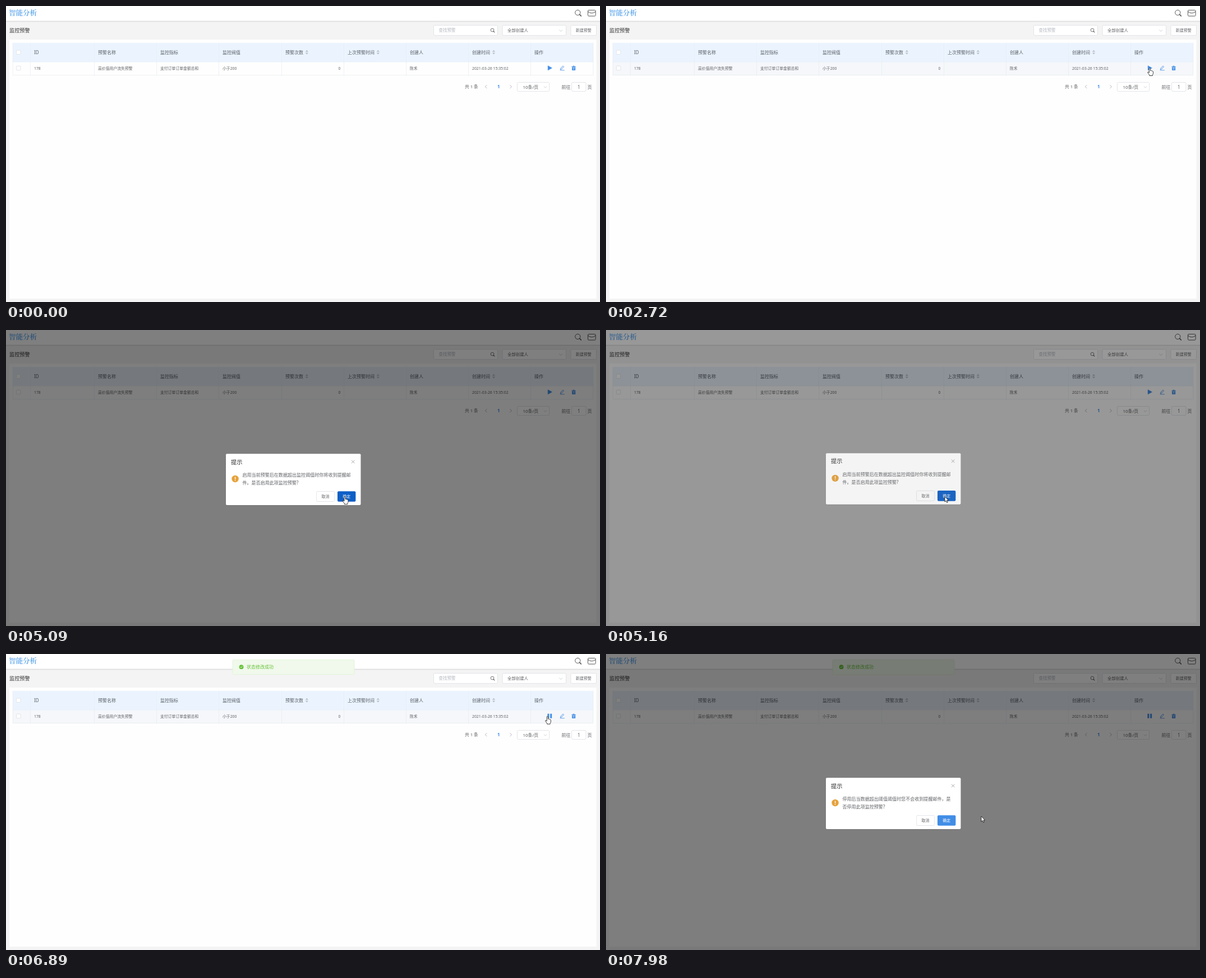
Animation, 1059 px wide and 529 px high, one loop 8 s. Source, as an HTML page:

```html
<!DOCTYPE html>
<html lang="zh-CN">
<head>
<meta charset="utf-8">
<style>
html, body { margin: 0; width: 100%; height: 100%; overflow: hidden; background: #f4f4f4; }
svg { display: block; width: 100%; height: 100%; font-family: "Noto Sans", "Noto Sans CJK SC", "Noto Sans CJK", sans-serif; }
</style>
</head>
<body>
<svg id="stage" viewBox="0 0 1059 529" xmlns="http://www.w3.org/2000/svg"></svg>
<script>
const LOOP = 8000;
const stage = document.getElementById('stage');

// Markup helpers; text is placed by its vertical middle.
const text = (x, y, size, str, fill = '#606266', extra = '') =>
  `<text x="${x}" y="${y + size * 0.37}" font-size="${size}" fill="${fill}" ${extra}>${str}</text>`;
const rect = (x, y, w, h, fill, extra = '') =>
  `<rect x="${x}" y="${y}" width="${w}" height="${h}" fill="${fill}" ${extra}/>`;
const box = (x, y, w, h, fill = '#fff', line = '#dcdfe6', r = 2) =>
  rect(x, y, w, h, fill, `rx="${r}" stroke="${line}" stroke-width=".8"`);
const line = (d, color, width = 0.8) =>
  `<path d="${d}" fill="none" stroke="${color}" stroke-width="${width}" stroke-linecap="round" stroke-linejoin="round"/>`;
const lens = (x, y, r, color, width) =>
  `<circle cx="${x}" cy="${y}" r="${r}" fill="none" stroke="${color}" stroke-width="${width}"/>` +
  line(`M${x + r * 0.72} ${y + r * 0.72}l${r * 0.6} ${r * 0.6}`, color, width * 1.5);
const middle = 'text-anchor="middle"';
const BLUE = '#418de6';

const columns = [
  [43.5, 'ID', '178'],
  [157.5, '预警名称', '高价值用户流失预警'],
  [268.5, '监控指标', '支付订单订单金额总和'],
  [379.5, '监控阀值', '小于200'],
  [491.5, '预警次数', ''],
  [602.5, '上次预警时间', ''],
  [713.5, '创建人', '陈禾'],
  [824.5, '创建时间', '2021-03-26 15:35:02'],
  [935.5, '操作', '']
];

function topBar() {
  return rect(0, 0, 1059, 29, '#ededed') + rect(0, 0, 1059, 28, '#dedede') + rect(0, 0, 1059, 26.6, '#fff') +
    text(5, 12.5, 12.5, '智能分析', '#6caeee',
      'font-weight="700" style="font-family:\'Noto Serif CJK SC\',\'Noto Sans CJK SC\',\'Noto Sans CJK\',serif"') +
    lens(1019.3, 11.8, 4.6, '#555', 1) +
    `<rect x="1037.5" y="7.4" width="13.6" height="10.6" rx="1.6" fill="none" stroke="#555"/>` +
    line('M1037.8 10.3q6.5 5 13 0', '#555', 1);
}

function filters() {
  return text(6, 43.3, 9.2, '监控预警', '#303133', 'font-weight="500"') +
    box(762.5, 34.5, 114, 18) + text(771.5, 43.7, 7.5, '查找预警', '#b4b8c0') + lens(867, 43, 2.9, '#555', 0.8) +
    box(885, 34.5, 113.5, 18) + text(894, 43.7, 7.4, '全部创建人') + line('M986.5 42.8l2.7 2.7l2.7-2.7', '#c0c4cc') +
    box(1007, 34.5, 45.5, 18) + text(1029.8, 43.7, 7, '新建预警', '#606266', middle);
}

function table() {
  const check = y => box(18.5, y, 7.5, 7.5, '#fff', '#dcdfe6', 1);
  const sort = x => `<path d="M${x - 2.7} 81.7l2.7-3l2.7 3zM${x - 2.7} 83.5l2.7 3l2.7-3z" fill="#b9bec8"/>`;
  let out = rect(12, 66, 1035, 34, '#ebf4fe') + rect(12, 100, 1035, 24, '#f5f7fa', 'id="row"');
  let grid = 'M12.3 66V123.7H1046.8V66M12 100H1047';
  for (const [x, head, cell] of columns) {
    grid += `M${x} 66V124`;
    out += text(x + 6.5, 82.8, 8, head, '#5a5e66', 'font-weight="500"') + text(x + 6.5, 111, 6.85, cell);
  }
  return out + line(grid, '#e6ebf3', 0.7) + check(79) + check(107.3) +
    text(596.5, 111, 6.85, '0', '#606266', 'text-anchor="end"') + sort(536.3) + sort(663.3) + sort(869.5);
}

function actions() {
  return `<path id="play" d="M966.2 106.8L973.4 110.8L966.2 114.8Z" fill="${BLUE}" stroke="${BLUE}" stroke-width=".6" stroke-linejoin="round"/>` +
    `<path id="pause" d="M965.4 106.8h3v8h-3zM970.2 106.8h3v8h-3z" fill="${BLUE}"/>` +
    line('M988.6 113.2l.5-2.1l4-4l1.5 1.5l-4 4z', BLUE, 0.9) + line('M988 114.8h7.4', BLUE, 0.8) +
    `<path d="M1008.4 107.9h7.4v1h-7.4zM1010.6 106.8h3v1h-3zM1009 109.4h6.2v4.8q0 .8-.8.8h-4.6q-.8 0-.8-.8z" fill="${BLUE}"/>` +
    line('M1011.2 110.8v2.6M1013 110.8v2.6', '#fff', 0.6);
}

function pager() {
  return text(818, 144, 7.7, '共 1 条') + line('M857 141.5l-2.6 2.7l2.6 2.7', '#a0a4ac') +
    text(878.3, 144, 8, '1', BLUE, middle + ' font-weight="700"') + line('M898.8 141.5l2.6 2.7l-2.6 2.7', '#a0a4ac') +
    box(911.5, 136.5, 57, 16) + text(921.5, 144.8, 7.9, '10条/页') + line('M959.3 144l2.2 2.2l2.2-2.2', '#c0c4cc') +
    text(990.5, 144.8, 8, '前往') + box(1008.5, 136.5, 25.5, 16) + text(1021.2, 144.8, 8, '1', '#606266', middle) +
    text(1036.5, 144.8, 8, '页');
}

function toast() {
  return box(404, 10.3, 217, 26.5, '#f0f9eb', '#e1f3d8') + '<circle cx="419.6" cy="23.2" r="3.9" fill="#67c23a"/>' +
    line('M417.8 23.3l1.3 1.3l2.4-2.6', '#fff', 0.8) + text(429, 23.1, 8, '状态修改成功', '#67c23a');
}

function dialog() {
  return rect(391.5, 222, 241.5, 92, '#000', 'rx="3" opacity=".1"') + rect(392, 221.3, 240.5, 91.7, '#fff', 'rx="2"') +
    text(401, 235.8, 10.3, '提示', '#303133') + line('M616.2 233l5 5m0-5l-5 5', '#909399') +
    '<circle cx="408.6" cy="266" r="6.2" fill="#e6a23c"/>' + line('M408.6 262.8v3.8', '#fff', 1.3) +
    '<circle cx="408.6" cy="268.9" r=".8" fill="#fff"/>' +
    text(421.5, 259.2, 8.05, '', '#606266', 'id="line1"') + text(421.5, 272.8, 8.05, '', '#606266', 'id="line2"') +
    box(553.7, 288.5, 32, 18) + text(569.6, 297.7, 7, '取消', '#606266', middle) +
    rect(591, 288.2, 32.4, 18.6, BLUE, 'rx="2" id="ok"') +
    text(607.2, 297.7, 7, '确定', '#fff', middle + ' font-weight="500"');
}

stage.innerHTML = rect(0, 0, 1059, 529, '#f4f4f4') + topBar() + filters() + rect(6, 60, 1046.5, 463, '#fefefe') +
  table() + actions() + pager() + `<g id="toast">${toast()}</g>` +
  rect(0, 0, 1059, 529, '#000', 'id="shade"') + `<g id="dialog">${dialog()}</g>` +
  '<g id="cursor" stroke="#111" stroke-width=".8" fill="#fff" stroke-linejoin="round">' +
  '<path id="arrow" d="M0 0V9.6L2.2 7.6L3.7 11L5.3 10.3L3.8 7H6.7Z"/>' +
  '<path id="hand" d="M-1.1 .6Q0-.7 1.1 .6V4.8Q2.2 4 3 5.1Q4.2 4.6 4.7 5.8Q6 5.5 6 7V9.6Q6 11.3 4.8 12.4V13.8H-.6V12.5L-3.6 8.6Q-4 7 -2.6 7.2L-1.1 8.5Z"/></g>';

const el = {};
for (const node of stage.querySelectorAll('[id]')) el[node.id] = node;

const clamp = v => Math.max(0, Math.min(1, v));
const bezier = (a, b, s) => 3 * a * s * (1 - s) ** 2 + 3 * b * s * s * (1 - s) + s ** 3;

// The CSS "ease" curve.
function ease(p) {
  let lo = 0, hi = 1;
  for (let i = 0; i < 20; i++) {
    const s = (lo + hi) / 2;
    if (bezier(0.25, 0.25, s) < p) lo = s; else hi = s;
  }
  return p <= 0 ? 0 : p >= 1 ? 1 : bezier(0.1, 1, lo);
}
const ramp = (t, start, length) => ease(clamp((t - start) / length));
const within = (t, spans) => spans.some(([a, b]) => t >= a && t < b);

const curves = {
  in: p => p * p,
  out: p => 1 - (1 - p) ** 2,
  both: p => p * p * (3 - 2 * p),
  lin: p => p
};
// Time, x, y and the curve used to get there.
const path = [
  [80, 1019, 531, 'lin'], [580, 907, 297, 'out'], [780, 907, 297, 'lin'], [1570, 969, 113, 'both'],
  [1700, 969, 113, 'lin'], [1800, 969.5, 110.7, 'both'], [2800, 969.5, 110.7, 'lin'],
  [3100, 965.5, 113.5, 'both'], [3170, 965, 113.5, 'lin'], [3510, 652, 301, 'both'], [3860, 592, 299, 'out'],
  [4040, 592, 299, 'lin'], [4200, 604, 297.5, 'both'], [5250, 604, 297.5, 'lin'], [5510, 632, 254.5, 'in'],
  [5870, 925, 123, 'both'], [6490, 963, 112, 'out'], [6770, 963, 112, 'lin'], [6990, 967, 111, 'both'],
  [7400, 967, 111, 'lin'], [7980, 669, 290, 'both']
];

function pointer(t) {
  const i = path.findIndex(k => k[0] > t);
  if (i < 0) return path[path.length - 1].slice(1, 3);
  if (i === 0) return path[0].slice(1, 3);
  const [t0, x0, y0] = path[i - 1], [t1, x1, y1, curve] = path[i];
  const p = curves[curve]((t - t0) / (t1 - t0));
  return [x0 + (x1 - x0) * p, y0 + (y1 - y0) * p];
}

const messages = [
  ['启用当前预警后在数据超出监控阈值时你将收到提醒邮', '件。是否启用此项监控预警?'],
  ['停用后当数据超出阈值阈值时您不会收到提醒邮件，是', '否停用此项监控预警?']
];
const OPEN1 = 2770, CLOSE = 5130, SAVED = 5230, OPEN2 = 7270;
const shown = (t, length) => ramp(t, OPEN1, length) - ramp(t, CLOSE, length) + ramp(t, OPEN2, length);

const mix = (a, b, p) => `rgb(${a.map((v, i) => Math.round(v + (b[i] - v) * p))})`;
const NORMAL = [65, 141, 230], HOVER = [103, 164, 235], PRESSED = [14, 95, 198];

function okColor(t) {
  if (t >= OPEN2) return mix(NORMAL, NORMAL, 0);
  if (t >= 4720) return mix(HOVER, PRESSED, ramp(t, 4720, 110));
  return mix(NORMAL, HOVER, ramp(t, 3690, 100));
}

function draw(t) {
  const fade = shown(t, 300);
  el.shade.setAttribute('opacity', 0.5 * shown(t, 200));
  el.dialog.setAttribute('opacity', fade);
  el.dialog.setAttribute('transform', `translate(0 ${-11.4 * (1 - fade)})`);
  const msg = messages[t < OPEN2 - 100 ? 0 : 1];
  el.line1.textContent = msg[0];
  el.line2.textContent = msg[1];
  el.ok.setAttribute('fill', okColor(t));

  el.toast.setAttribute('opacity', ramp(t, SAVED, 300));
  el.toast.setAttribute('transform', `translate(0 ${-27 * (1 - ramp(t, SAVED, 400))})`);
  el.play.setAttribute('opacity', t < SAVED ? 1 : 0);
  el.pause.setAttribute('opacity', t < SAVED ? 0 : 1);
  el.row.setAttribute('opacity',
    ramp(t, 1340, 250) - ramp(t, 2800, 250) + ramp(t, 5870, 250) - ramp(t, 7300, 250));

  const [x, y] = pointer(t);
  const hand = within(t, [[1560, 2800], [3690, 5150], [6400, 7300]]);
  el.cursor.setAttribute('transform', `translate(${x} ${y})`);
  el.cursor.setAttribute('opacity', t < 90 ? 0 : 1);
  el.arrow.setAttribute('opacity', hand ? 0 : 1);
  el.hand.setAttribute('opacity', hand ? 1 : 0);
}

const start = performance.now();
function tick() {
  draw((performance.now() - start) % LOOP);
  requestAnimationFrame(tick);
}
tick();
</script>
</body>
</html>
```
